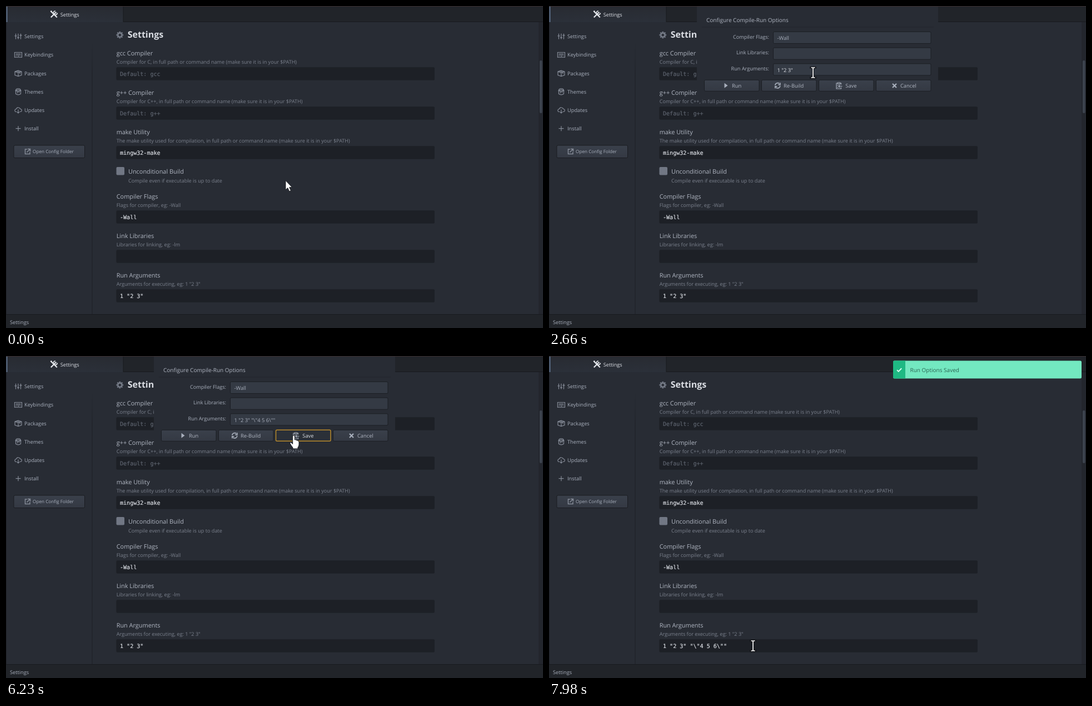
Recreate the animation shown at these times as an HTML page. Size 966 px wide and 580 px high, loop 8 s.

```html
<!DOCTYPE html>
<html lang="en">
<head>
<meta charset="utf-8">
<title>Compile-Run Options</title>
<style>
  html, body { margin: 0; width: 100%; height: 100%; overflow: hidden; background: #282c34; }
  svg { display: block; width: 966px; height: 580px; }
  text { font-family: "Open Sans", "Noto Sans", sans-serif; white-space: pre; text-rendering: geometricPrecision; }
  .mono { font-family: "DejaVu Sans Mono", monospace; stroke: currentColor; stroke-width: .2; }
  .line { fill: none; stroke: #858b97; stroke-width: 1.2; }
</style>
</head>
<body>
<svg id="stage" viewBox="0 0 966 580">
  <defs>
    <linearGradient id="btn" x2="0" y2="1">
      <stop stop-color="#3a404b"/><stop offset="1" stop-color="#343943"/>
    </linearGradient>
    <linearGradient id="tab" x2="0" y2="1">
      <stop stop-color="#282b32"/><stop offset="1" stop-color="#2b3039"/>
    </linearGradient>
    <linearGradient id="divider" x2="0" y2="1">
      <stop stop-color="#1d2026" stop-opacity="0"/><stop offset=".12" stop-color="#1d2026"/>
    </linearGradient>
  </defs>
  <g id="page"></g>
  <g id="dialog"></g>
  <g id="notice">
    <rect x="619" y="8.5" width="339" height="32" rx="2.5" fill="#73e8c0"/>
    <path d="M641 8.5V40.5H621.5A2.5 2.5 0 0 1 619 38V11A2.5 2.5 0 0 1 621.5 8.5Z" fill="#1fb983"/>
    <path d="M626 25.2l2.7 2.7 5.5-5.7" fill="none" stroke="#d5fff0" stroke-width="2"/>
  </g>
  <g id="mouse">
    <path id="arrow" d="M0 0V16.5L3.8 13L6.6 19.3L9.4 18L6.7 12H11.5Z" fill="#fff" stroke="#15171b" stroke-width=".8"/>
    <g id="beam" fill="none">
      <path d="M-4-9H4M-4 9H4M0-9V9" stroke="#101216" stroke-width="3.4" stroke-linecap="square"/>
      <path d="M-3.5-9H-1L0-8.2L1-9H3.5M-3.5 9H-1L0 8.2L1 9H3.5M0-8.5V8.5" stroke="#fff" stroke-width="1.7"/>
    </g>
    <path id="hand" d="M-3.3 1Q-1.5-1 .3 1V8Q2.5 6.8 3.4 9Q5.5 8 6.1 10Q8 9.800 8 12V17Q7.500 20 6 21.500V24H-3V22Q-5.500 19-8 14.500Q-8.500 12.500-6.500 12.600L-3.300 15.500Z" fill="#fff" stroke="#15171b" stroke-width=".9"/>
  </g>
</svg>
<script>
const INK = "#a8afbc", LABEL = "#b0b6c2", DIM = "#7b818d", HINT = "#5d636e", BRIGHT = "#dadde3";
const BASE_ARGS = '1 "2 3"', TYPED = ' "\\"4 5 6\\""';
const KEYS = [2170, 2800, 3010, 3220, 3640, 3710, 3850, 3920, 3990, 4900, 5110, 5320];
const OPEN = 1050, FOCUS = 1260, REFOCUS = 1890, SAVE = 6230, CLOSE = 6370;
const STEP = 70, LOOP = 8000, BLINK = 490;

const $ = id => document.getElementById(id);
const escape = s => s.replace(/&/g, "&amp;").replace(/</g, "&lt;");
const text = (s, x, y, size, fill = INK, extra = "") =>
  `<text x="${x}" y="${y}" font-size="${size}" style="fill:${fill};color:${fill}" ${extra}>${escape(s)}</text>`;
const rect = (x, y, w, h, fill, extra = "") =>
  `<rect x="${x}" y="${y}" width="${w}" height="${h}" fill="${fill}" ${extra}/>`;
const icon = (x, y, d, extra = "") =>
  `<path class="line" transform="translate(${x} ${y})" d="${d}" ${extra}/>`;
const mono = (s, y, fill, id = "") => text(s, 205, y, 10.05, fill, `class="mono" id="${id}"`);

const SIDE = [
  ["Settings", "M2-5V5M6.5-5V5M11-5V5M0-1H4M4.5 2H8.5M9-2H13"],
  ["Keybindings", "M0-4.5H13V4.5H0ZM2-2H11M2 0H11M2 2.3H3.5M5 2.3H8.5M10 2.3H11"],
  ["Packages", "M.5-3L6.5-5L12.5-3V3.5L6.5 5.5L.5 3.5ZM.5-3L6.5-1L12.5-3M6.5-1V5.5M3.5-4L9.5-2V1"],
  ["Themes", "M2-2V4Q6.5 7 11 4V-2M2-2Q2-5.5 6.5-5.5T11-2Q6.5 1 2-2M1-1.5Q6.5-5 12-1.5M5 0V3M8 0V2"],
  ["Updates", "M4 3H3Q0 3 .5 0Q1-2 3-2Q4-5 7-4.5Q10-4 10-2Q13-2 12.8 1Q12.5 3 10 3H9M6.5-1V5M4.5 3.5L6.5 5.5L8.5 3.5"],
  ["Install", "M2 0H11M6.5-4.5V4.5"]
];
const FIELDS = [
  [85, "gcc Compiler", "Compiler for C, in full path or command name (make sure it is in your $PATH)", "Default: gcc"],
  [156, "g++ Compiler", "Compiler for C++, in full path or command name (make sure it is in your $PATH)", "Default: g++"],
  [227, "make Utility", "The make utility used for compilation, in full path or command name (make sure it is in your $PATH)", "mingw32-make"],
  [343, "Compiler Flags", "Flags for compiler, eg: -Wall", "-Wall"],
  [414, "Link Libraries", "Libraries for linking, eg: -lm", ""],
  [485, "Run Arguments", 'Arguments for executing, eg: 1 "2 3"', BASE_ARGS]
];

function buildPage() {
  const teeth = Array.from({ length: 8 }, (_, i) =>
    rect(-1.3, -6.3, 2.6, 3, "#737985", `transform="rotate(${i * 45})"`)).join("");
  let s = rect(0, 0, 966, 580, "#282c34")
    + rect(0, 0, 966, 28, "#212429") + rect(211, 28, 755, 1, "#181a1f")
    + rect(0, 1, 211, 28, "url(#tab)") + rect(210.5, 1, 1, 28, "#181a1f")
    + rect(0, 0, 966, 1, "#382d2e") + rect(1, 1, 1.3, 28, "#6d86a6")
    + rect(0, 29, 1, 526, "#1e2127")
    + icon(86.3, 15, "M-5.5 5.5L4 -4M-5.5-5.5L5.5 5.5", 'style="stroke:#e4e7ec;stroke-width:2.2"')
    + icon(86.3, 15, "M2.5-6A3.5 3.5 0 1 0 6-2.5M-6.3-5L-4-6.3", 'style="stroke:#e4e7ec;stroke-width:1.7"')
    + text("Settings", 97.7, 19, 9.2, BRIGHT)
    + rect(154.5, 62, 1, 493, "url(#divider)")
    + rect(958, 29, 8, 526, "#23262d") + rect(960, 98, 4.5, 95, "#3d434e", 'rx="2"')
    + rect(0, 555, 966, 25, "#212429") + rect(0, 555, 966, 1, "#181a1f")
    + text("Settings", 7, 572.5, 9.2);
  SIDE.forEach(([name, d], i) => {
    const y = 54.8 + i * 33.18;
    s += icon(15.5, y, d) + text(name, 33, y + 3.5, 9.25);
  });
  s += rect(14, 251, 127.5, 22.5, "url(#btn)", 'rx="2" stroke="#1a1c21"')
    + icon(34, 262, "M4-4H.5V4.5H9V1M5-4.5H9.5V0M9-4L3.5 1.5", 'style="stroke-width:1.5"')
    + text("Open Config Folder", 48, 265, 8.2)
    + `<g transform="translate(204.8 52.2)">${teeth}<circle r="3.5" fill="none" stroke="#737985" stroke-width="2.4"/></g>`
    + text("Settings", 218.7, 57, 16, BRIGHT, 'font-weight="700"');
  FIELDS.forEach(([y, label, note, value], i) => {
    s += text(label, 198.7, y + 4.2, 10.9, LABEL) + text(note, 198.7, y + 18.5, 9.08, DIM)
      + rect(198.4, y + 25.3, 572.6, 23.4, "#1d2026", 'rx="2"')
      + mono(value, y + 40.6, i < 2 ? HINT : BRIGHT, i === 5 ? "pageArgs" : "");
  });
  return s + rect(198.5, 290, 14.5, 14.5, "#717784", 'rx="2"')
    + text("Unconditional Build", 220, 302, 10.9, LABEL)
    + text("Compile even if executable is up to date", 220, 318, 9.13, DIM);
}

function buildDialog() {
  let s = rect(266, 0, 434, 160, "#282c34") + rect(266, 0, 434, 1, "#382d2e")
    + rect(275, 37.5, 417, 1, "#22252c")
    + text("Configure Compile-Run Options", 283, 29, 10, LABEL);
  [["Compiler Flags:", "flags", "-Wall"], ["Link Libraries:", "libs", ""], ["Run Arguments:", "args", BASE_ARGS]]
    .forEach(([label, id, value], i) => {
      const y = 46.5 + i * 28.7;
      s += text(label, 396, y + 12.2, 9.15, INK, 'text-anchor="end"')
        + rect(403.5, y, 283.5, 21, "#343a44", 'rx="2" stroke="#1b1e23"')
        + text(value, 410.4, y + 14.6, 9.4, INK, `id="${id}"`);
    });
  const stroke = w => `style="stroke:${INK};stroke-width:${w}"`;
  [
    ["Run", 329, icon(315.5, 143.3, "M0-4.5L6 0L0 4.5Z", `style="fill:${INK};stroke:none"`)],
    ["Re-Build", 422, icon(411.3, 143.3, "M-4.5-.5A4.5 4.5 0 0 1 3-3.5M4.5-5V-1.5H1M4.5.5A4.5 4.5 0 0 1-3 3.5M-4.5 5V1.5H-1", stroke(1.7))],
    ["Save", 533.3, icon(516.5, 143.5, "M3-4.5H.5V5.5H9V3M7-4.5H9V-2M3-5.5H7V-3H3ZM11 1H5M7-1.5L4.5 1L7 3.5M2-.5H4M2 3H4", stroke(1.2))],
    ["Cancel", 632, icon(621.5, 143.5, "M-3.5-3.5L3.5 3.5M3.5-3.5L-3.5 3.5", stroke(2.3))]
  ].forEach(([name, x, glyph], i) => {
    s += rect(279.5 + i * 103, 133.3, 98.5, 20, "url(#btn)", `rx="2" stroke="#1b1e23" id="${name}"`)
      + glyph + text(name, x, 147, 9.3, LABEL, `id="${name}Label"`);
  });
  return s + rect(0, 0, 1, 13, "#e6e8ec", 'id="caret"');
}

$("page").innerHTML = buildPage();
$("dialog").innerHTML = buildDialog();
$("notice").insertAdjacentHTML("beforeend", text("Run Options Saved", 649.5, 28.8, 10, "#2b6552"));

// Pointer stops: time, x, y
const PATH = [
  [1400, 503, 314.5], [1470, 480, 262], [1540, 440, 180], [1610, 412, 128], [1680, 440, 116], [1750, 475, 120],
  [5810, 475, 120], [5950, 484, 126], [6090, 511, 141], [6160, 519, 143],
  [6860, 519, 143], [6930, 502, 225], [7000, 470, 320], [7070, 447.5, 377],
  [7210, 421, 437], [7420, 384, 502], [7630, 366, 522], [7910, 367, 522]
];

function pointer(t) {
  const i = PATH.findIndex(p => p[0] > t);
  if (i === 0) return PATH[0].slice(1);
  if (i < 0) return PATH[PATH.length - 1].slice(1);
  const a = PATH[i - 1], b = PATH[i], k = (t - a[0]) / (b[0] - a[0]);
  return [a[1] + (b[1] - a[1]) * k, a[2] + (b[2] - a[2]) * k];
}

function cursorKind(x, y, open) {
  if (open && y < 160) {
    if (y > 133 && y < 154 && x > 279 && x < 687) return "hand";
    return x > 403 && x < 687 && [46.5, 75.2, 103.9].some(f => y >= f && y <= f + 21) ? "beam" : "arrow";
  }
  return x > 198 && x < 771 && FIELDS.some(f => y >= f[0] + 25 && y <= f[0] + 49) ? "beam" : "arrow";
}

const show = (id, on) => $(id).setAttribute("visibility", on ? "visible" : "hidden");

function render(time) {
  const t = Math.floor(time / STEP) * STEP;
  const open = t >= OPEN && t < CLOSE;
  const count = KEYS.filter(k => k <= t).length;
  const inArgs = t >= REFOCUS && t < SAVE;

  $("dialog").style.display = open ? "" : "none";
  $("dialog").setAttribute("opacity", t < OPEN + STEP ? 0.5 : 1);
  $("flags").style.fill = t >= FOCUS && t < REFOCUS ? BRIGHT : INK;
  $("args").style.fill = inArgs ? BRIGHT : INK;
  $("args").textContent = BASE_ARGS + TYPED.slice(0, count);
  $("pageArgs").textContent = BASE_ARGS + (t >= CLOSE ? TYPED : "");

  const caret = $("caret"), field = $(inArgs ? "args" : "flags");
  const since = inArgs ? (count ? KEYS[count - 1] : REFOCUS) : FOCUS;
  const lit = open && t >= FOCUS && t < SAVE && Math.floor((t - since) / BLINK) % 2 === 0;
  caret.style.display = lit ? "" : "none";
  if (lit) {
    caret.setAttribute("x", Math.round(410.4 + field.getComputedTextLength()));
    caret.setAttribute("y", inArgs ? 108 : 51);
  }

  const [x, y] = pointer(t), kind = cursorKind(x, y, open);
  const pressed = t >= SAVE, hover = kind === "hand" && x > 485;
  $("Save").setAttribute("stroke", pressed ? "#b98a2b" : "#1b1e23");
  $("Save").setAttribute("stroke-width", pressed ? 1.5 : 1);
  $("Save").setAttribute("fill", pressed ? "#2b3038" : hover ? "#3d434e" : "url(#btn)");
  $("SaveLabel").style.fill = hover ? BRIGHT : LABEL;
  ["arrow", "beam", "hand"].forEach(id => show(id, id === kind));
  $("mouse").setAttribute("transform", `translate(${x} ${y})`);

  const k = Math.max(0, Math.min(1, (t - CLOSE + STEP) / (3 * STEP)));
  show("notice", t >= CLOSE);
  $("notice").setAttribute("opacity", k);
  $("notice").setAttribute("transform", `translate(0 ${8.5 * (1 - k)}) scale(1 ${k})`);
}

const start = performance.now();
function frame() {
  render((performance.now() - start) % LOOP);
  requestAnimationFrame(frame);
}
frame();
</script>
</body>
</html>
```
